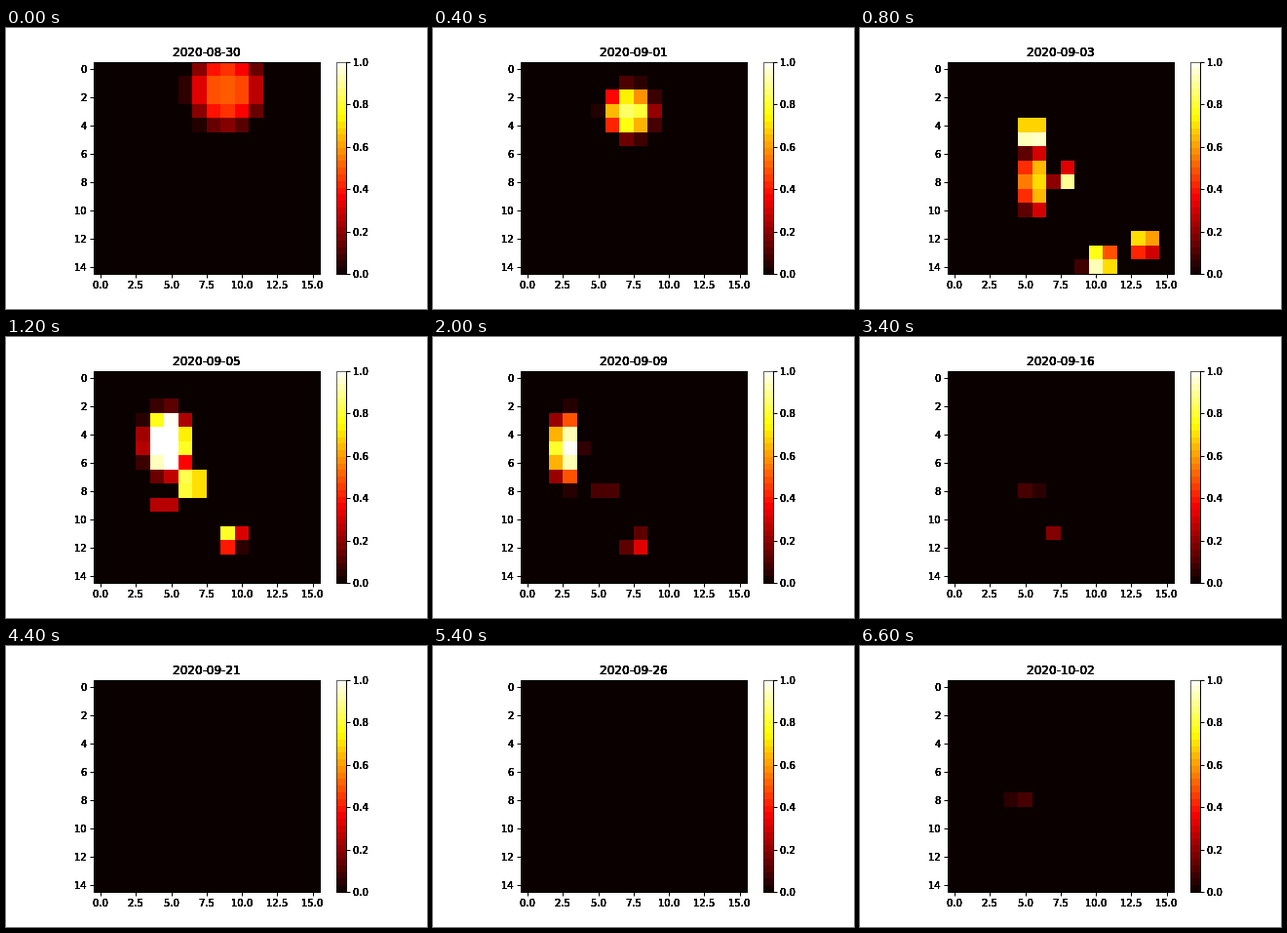
Animation, 432 px wide and 288 px high, one loop 7.6 s. Source, as an HTML page with a canvas:

```html
<!DOCTYPE html>
<html lang="en">
<head>
<meta charset="utf-8">
<title>Daily heat map</title>
<style>
  html, body { margin: 0; width: 100%; height: 100%; overflow: hidden; background: #fff; }
  canvas { display: block; }
</style>
</head>
<body>
<canvas id="plot" width="432" height="288"></canvas>
<script>
const ctx = document.getElementById("plot").getContext("2d");
const COLS = 16, ROWS = 15, CELL = 14.496;
const LEFT = 89.904, TOP = 34.56, BOTTOM = 252;
const STEP = 200, LAST = 33, LOOP = 7600;
const FADE = 1.5, FAINT = .035, BANDS = 32;

// A cloud is a soft, flat-topped ellipse that drifts and reshapes between its poses.
const pose = (day, row, col, tall, wide, peak) => ({ day, row, col, tall, wide, peak });
const clouds = {
  core: [
    pose(0, 1.5, 8.9, 2.5, 2.4, .5),
    pose(4, 4.6, 5.5, .9, .9, 1.2),
    pose(6, 4.6, 4.7, 2.1, 1.5, 1.45),
    pose(10, 5, 2.7, 2.3, 1, 1),
    pose(17, 5, .5, 1.5, 1, 0),
  ],
  tail: [
    pose(4, 8, 5.7, 2.2, 1, .7),
    pose(6, 7.5, 6.4, 1.1, 1.1, .9),
  ],
  spark: [pose(4, 7.8, 7.9, .8, .8, .9)],
  east: [pose(4, 12.3, 13.4, .9, 1, .75)],
  south: [
    pose(4, 13.6, 10.3, .9, 1.1, 1),
    pose(6, 11.25, 9.2, .85, .85, .8),
    pose(10, 11.7, 7.7, .75, .75, .35),
    pose(17, 11, 7, .6, .6, .18),
  ],
  ember: [
    pose(6, 9, 4.5, .6, .8, .3),
    pose(10, 8, 5.5, .5, .8, .11),
    pose(17, 8, 5.3, .5, .8, .09),
  ],
  late: [pose(LAST, 8, 4.7, .5, .8, .09)],
};

// Blend between poses; before the first and after the last, fade in place.
function poseAt(track, day) {
  const next = track.findIndex(p => p.day >= day);
  const a = track[next < 0 ? track.length - 1 : Math.max(0, next - 1)];
  const b = next < 0 ? a : track[next];
  if (a === b) {
    const fade = Math.max(0, 1 - Math.abs(day - a.day) / FADE);
    return { ...a, peak: a.peak * fade };
  }
  const t = (day - a.day) / (b.day - a.day);
  const mixed = {};
  for (const k in a) mixed[k] = a[k] + (b[k] - a[k]) * t;
  return mixed;
}

function heat(poses, row, col) {
  let sum = 0;
  for (const p of poses) {
    const d2 = ((row - p.row) / p.tall) ** 2 + ((col - p.col) / p.wide) ** 2;
    sum += p.peak * Math.exp(-d2 * d2);
  }
  return sum;
}

function hot(v) {
  const ramp = (lo, hi) => Math.round(255 * Math.min(1, Math.max(0, (v - lo) / (hi - lo))));
  const r = Math.min(255, Math.round(255 * (.0416 + v * 2.6254)));
  return `rgb(${r},${ramp(.365, .746)},${ramp(.746, 1)})`;
}

const edgeX = c => Math.round(LEFT + CELL * c);
const edgeY = r => Math.round(TOP - .06 + CELL * r);

function text(str, x, y, align, size = 10) {
  ctx.font = `${size}px "DejaVu Sans", sans-serif`;
  ctx.fillStyle = "#000";
  const start = Math.round(x - ctx.measureText(str).width * align);
  // Repeated passes harden the soft edges.
  for (let n = 0; n < 8; n++) ctx.fillText(str, start, y);
}

function bar(x, y, w, h, color = "#000") {
  ctx.fillStyle = color;
  ctx.fillRect(x, y, w, h);
}

function drawAxes() {
  ctx.strokeStyle = "#000";
  ctx.lineWidth = 1;
  ctx.strokeRect(90.5, 35.5, 232, 217);
  for (let i = 0; i < 7; i++) {
    const x = LEFT + CELL * (i * 2.5 + .5);
    bar(Math.round(x), 253, 1, 3.5);
    text((i * 2.5).toFixed(1), x, 267, .5);
  }
  for (let r = 0; r < ROWS; r += 2) {
    const y = TOP + CELL * (r + .5);
    bar(86.5, Math.round(y), 3.5, 1);
    text(String(r), 82.9, Math.round(y + 4), 1);
  }
}

function drawColorbar() {
  for (let y = 35; y < BOTTOM; y++) {
    const v = (BOTTOM - y - .5) / (BOTTOM - TOP);
    bar(339, y, 11, 1, hot((Math.floor(v * BANDS) + .5) / BANDS));
  }
  const soft = "rgba(0,0,0,.6)";
  bar(339, 35, 10, 1, soft);
  bar(339, 36, 1, 216, soft);
  bar(349, 35, 1, 218);
  bar(339, 252, 10, 1);
  for (let i = 0; i <= 5; i++) {
    const y = BOTTOM - (BOTTOM - TOP) * i / 5;
    bar(350, Math.round(y), 3.5, 1);
    text((i / 5).toFixed(1), 356.45, Math.round(y + 4), 0);
  }
}

function drawCells(day) {
  const poses = Object.values(clouds).map(track => poseAt(track, day));
  bar(90, 35, 232, 217, hot(0));
  for (let r = 0; r < ROWS; r++) {
    for (let c = 0; c < COLS; c++) {
      const v = heat(poses, r, c);
      if (v < FAINT) continue;
      const x = edgeX(c), y = edgeY(r);
      bar(x, y, edgeX(c + 1) - x, edgeY(r + 1) - y, hot(v));
    }
  }
}

function draw(day) {
  bar(0, 0, 432, 288, "#fff");
  drawCells(day);
  drawAxes();
  drawColorbar();
  const date = new Date(Date.UTC(2020, 7, 30 + day)).toISOString().slice(0, 10);
  text(date, 205.9, 29, .5, 12);
}

let shown = -1;
const start = performance.now();
function frame() {
  const time = (performance.now() - start) % LOOP;
  const day = Math.min(LAST, Math.floor(time / STEP));
  if (day !== shown) draw(shown = day);
  requestAnimationFrame(frame);
}
frame();
</script>
</body>
</html>
```
